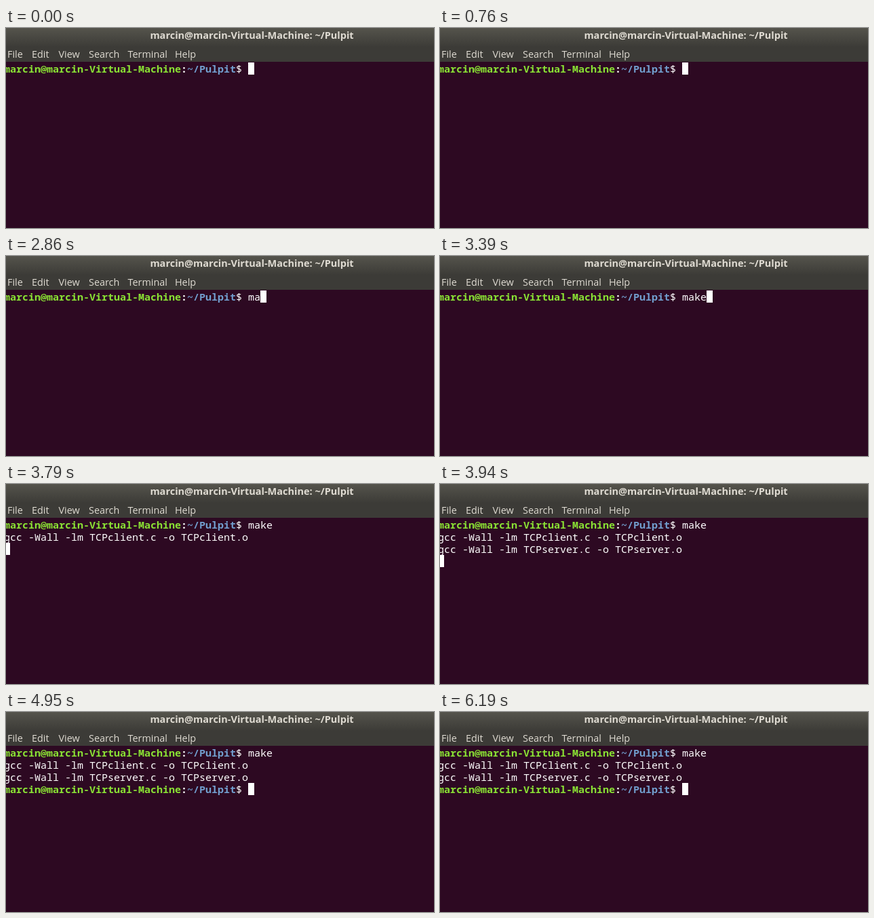
Write an HTML page with a canvas that moves like this. It is 631 by 296 pixels and loops after 6.44 s.

```html
<!DOCTYPE html>
<html lang="en">
<head>
<meta charset="utf-8">
<title>Terminal</title>
<style>
  html, body { margin: 0; width: 100%; height: 100%; overflow: hidden; background: #2d0922; }
  canvas { display: block; }
</style>
</head>
<body>
<canvas id="stage" width="631" height="296"></canvas>
<script>
const ctx = document.getElementById('stage').getContext('2d');
const LOOP = 6440;
const CELL_W = 9, CELL_H = 18, LEFT = -3, TOP = 51;
const MONO = '15px "Noto Sans Mono", monospace';
const SANS = '"Open Sans", "Noto Sans", sans-serif';
const GREEN = '#8ae234', BLUE = '#729fcf', WHITE = '#ffffff';

const HOST = 'marcin@marcin-Virtual-Machine';
const PATH = '~/Pulpit';
const PROMPT_LENGTH = (HOST + ':' + PATH + '$ ').length;
const COMMAND = 'make';
const KEY_TIMES = [2460, 2860, 3160, 3390];
const HIDDEN = [[210, 760], [1400, 2000], [4400, 4950], [5580, 6190]];
const OUTPUT = [
  { at: 3790, text: 'gcc -Wall -lm TCPclient.c -o TCPclient.o' },
  { at: 3940, text: 'gcc -Wall -lm TCPserver.c -o TCPserver.o' }
];
const DONE = 4020;
const MENU = [['File', 2], ['Edit', 38], ['View', 77.5], ['Search', 122], ['Terminal', 179.5], ['Help', 249]];

function drawChrome() {
  const shade = ctx.createLinearGradient(0, 0, 0, 28);
  shade.addColorStop(0, '#55544c');
  shade.addColorStop(1, '#3c3b37');
  ctx.fillStyle = shade;
  ctx.fillRect(0, 0, 631, 50);
  ctx.fillStyle = '#dfdbd2';
  ctx.font = 'bold 14.5px ' + SANS;
  ctx.textAlign = 'center';
  ctx.fillText(HOST + ': ' + PATH, 362.5, 16);
  ctx.textAlign = 'left';
  ctx.font = '14.4px ' + SANS;
  for (const [label, x] of MENU) ctx.fillText(label, x, 44);
}

// Writes on the character grid and returns the next column.
function write(text, col, row, color = WHITE, bold = false) {
  ctx.font = (bold ? 'bold ' : '') + MONO;
  ctx.fillStyle = color;
  ctx.fillText(text, LEFT + col * CELL_W, TOP + row * CELL_H + 15);
  return col + text.length;
}

function drawPrompt(row) {
  let col = write(HOST, 0, row, GREEN, true);
  col = write(':', col, row, WHITE, true);
  col = write(PATH, col, row, BLUE, true);
  write('$', col, row);
}

function draw(t) {
  ctx.fillStyle = '#2d0922';
  ctx.fillRect(0, 0, 631, 296);
  drawChrome();

  const typed = KEY_TIMES.filter(at => t >= at).length;
  drawPrompt(0);
  let col = write(COMMAND.slice(0, typed), PROMPT_LENGTH, 0);
  let row = 0;
  for (const { at, text } of OUTPUT) {
    if (t < at) break;
    write(text, 0, ++row);
  }
  if (row > 0) {
    row++;
    col = 0;
  }
  if (t >= DONE) {
    drawPrompt(row);
    col = PROMPT_LENGTH;
  }
  if (!HIDDEN.some(([from, to]) => t >= from && t < to)) {
    ctx.fillStyle = WHITE;
    ctx.fillRect(LEFT + col * CELL_W, TOP + row * CELL_H, CELL_W, CELL_H);
  }
}

const start = performance.now();
function tick() {
  draw((performance.now() - start) % LOOP);
  requestAnimationFrame(tick);
}
tick();
</script>
</body>
</html>
```
